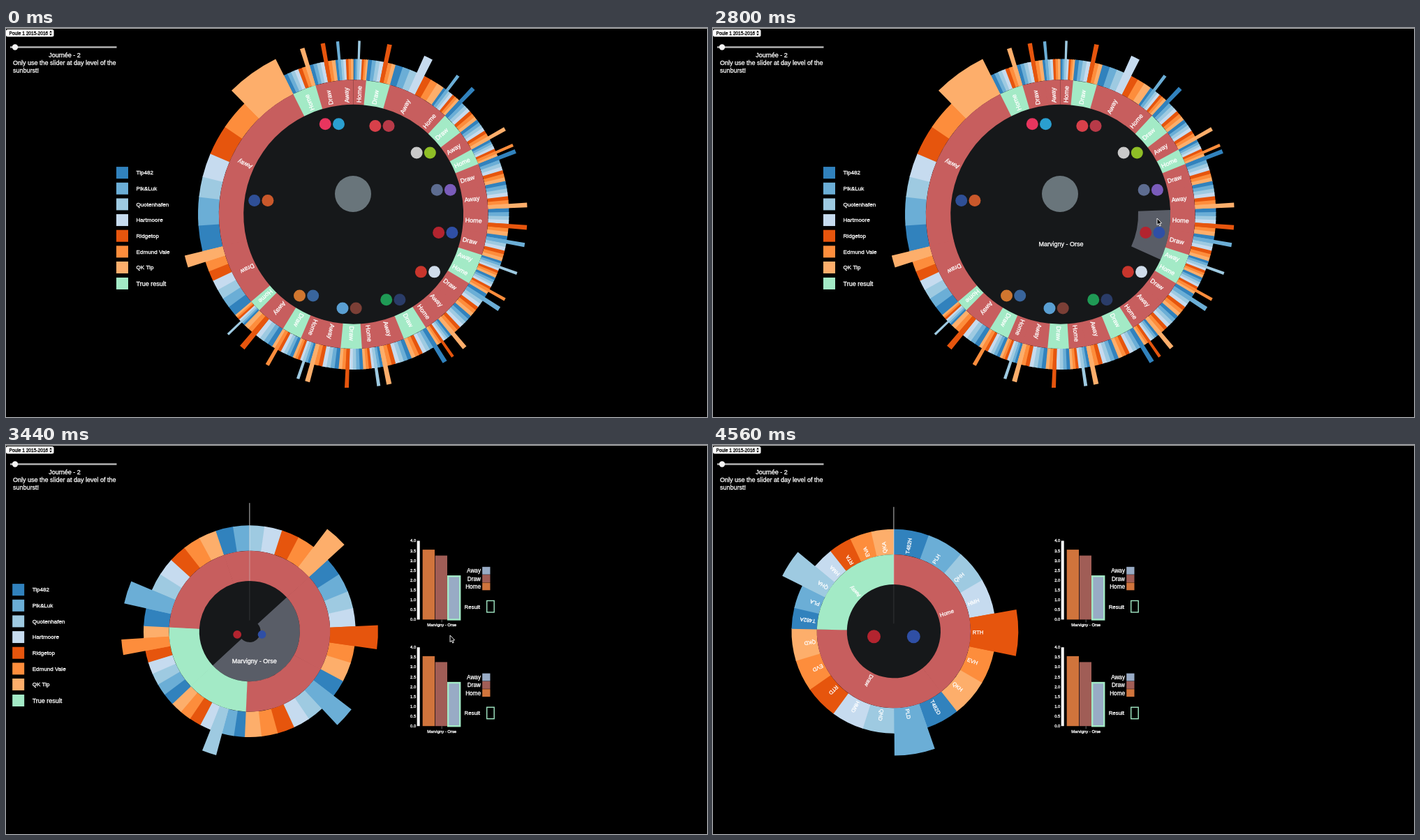
Animation of 1004 by 558 pixels, one loop 4.88 s. Source, as an HTML page with a canvas:

```html
<!DOCTYPE html>
<html lang="en">
<head>
<meta charset="utf-8">
<title>Odds sunburst</title>
<style>
html, body { margin: 0; width: 100%; height: 100%; overflow: hidden; background: #000; }
canvas { display: block; width: 1004px; height: 558px; }
</style>
</head>
<body>
<canvas id="stage"></canvas>
<script>
const W = 1004, H = 558, LOOP = 4880, STEP = 80;
const canvas = document.getElementById('stage');
const g = canvas.getContext('2d');
const dpr = window.devicePixelRatio || 1;
canvas.width = W * dpr;
canvas.height = H * dpr;

const FONT = '"Liberation Sans", Arial, sans-serif';
const DARK = '#16181a', HOVER = '#595d67', RED = '#c75e5e', GREEN = '#a3eac6';
const BOOKS = [
  ['Tip482', 'T482', '#3182bd'],
  ['Pik&Luk', 'PL', '#6baed6'],
  ['Quotenhafen', 'QH', '#9ecae1'],
  ['Hartmoore', 'HM', '#c6dbef'],
  ['Ridgetop', 'RT', '#e6550d'],
  ['Edmund Vale', 'EV', '#fd8d3c'],
  ['QK Tip', 'QK', '#fdae6b']
];
const OUTCOMES = ['Home', 'Draw', 'Away'];
const FIXTURE = 'Marvigny - Orse';
const CX = 497.7, CY = 267.2, FOCUS = 3;

// end angles of home, draw, away | best bookmaker of each | result | team colours
const MATCHES = [
  [[5.4, 15.7, 35.4], [2, 4, 3], 1, '#d8404a', '#b83a48'],
  [[42.8, 52.5, 61.2], [1, 0, 6], 1, '#c9c9c9', '#8fbe26'],
  [[68, 77.6, 87.7], [5, 0, 6], 0, '#5d6c90', '#7a5cba'],
  [[98.1, 107.6, 114.1], [4, 1, 2], 2, '#b3242f', '#2f4fa5'],
  [[120.9, 131, 141], [5, 1, 6], 0, '#c8352c', '#cfdcea'],
  [[147.5, 158, 169], [4, 0, 6], 1, '#1f9a55', '#2a3c68'],
  [[176.4, 185.5, 196.2], [2, 4, 6], 1, '#5a9fd2', '#7b3f36'],
  [[203, 211.6, 224.4], [2, 5, 4], 1, '#d0762f', '#39659c'],
  [[229.5, 256.2, 333.4], [2, 6, 6], 0, '#2f4f96', '#c9582b'],
  [[343.6, 353.3, 360], [6, 4, 1], 0, '#e8355e', '#2a9fd0']
];
// bookmaker shares where they clearly differ, keyed by match and outcome
const SHARES = {
  '3-0': [20, 21, 19, 20, 21.6, 18.8, 21.6],
  '3-1': [19, 19, 18, 18.6, 19, 18.1, 18.3],
  '3-2': [11.8, 13.1, 13.1, 12, 13, 12.3, 12.7],
  '8-2': [9.6, 10.6, 7.6, 9, 11.3, 11.3, 18]
};

// Build the tree as flat lists of slices, x in turns.
const matches = [], outcomes = [], odds = [];
let x = 0;
MATCHES.forEach(([ends, best, result, ...teams], m) => {
  const m0 = x;
  ends.forEach((end, o) => {
    const x0 = x, x1 = end / 360;
    outcomes.push({ x0, x1, color: o === result ? GREEN : RED, label: OUTCOMES[o], match: m });
    const share = SHARES[m + '-' + o] || BOOKS.map((_, b) => b === best[o] ? 1.07 : 1);
    const sum = share.reduce((a, b) => a + b);
    BOOKS.forEach(([, code, color], b) => {
      const next = x + (x1 - x0) * share[b] / sum;
      odds.push({ x0: x, x1: next, color, label: code + OUTCOMES[o][0], match: m, top: b === best[o] });
      x = next;
    });
    x = x1;
  });
  matches.push({ x0: m0, x1: x, teams });
});

const clamp = v => Math.max(0, Math.min(1, v));
const mix = (a, b, p) => a + (b - a) * p;
const ease = u => u < .5 ? 4 * u ** 3 : 1 - 4 * (1 - u) ** 3;

function track(keys, t) {
  if (t <= keys[0][0]) return keys[0][1];
  for (let i = 1; i < keys.length; i++) {
    const [ta, a] = keys[i - 1], [tb, b] = keys[i];
    if (t <= tb) return mix(a, b, (t - ta) / (tb - ta));
  }
  return keys[keys.length - 1][1];
}

const SLIDE = [[3200, 0], [3280, .1], [3440, .545], [3600, .872], [3760, 1]];
const MOUSE_X = [[1920, 640], [2160, 637], [2800, 636]];
const MOUSE_Y = [[1920, 262], [2160, 264], [2400, 267], [2800, 273]];

// A thin outline gives the text its slightly heavy weight.
function text(str, x, y, size, align = 'left', color = '#fff') {
  g.font = size + 'px ' + FONT;
  g.textAlign = align;
  g.textBaseline = 'alphabetic';
  g.fillStyle = g.strokeStyle = color;
  g.lineWidth = .3;
  g.fillText(str, x, y + size * .35);
  g.strokeText(str, x, y + size * .35);
}

function rect(x, y, w, h, color) {
  g.fillStyle = color;
  g.fillRect(x, y, w, h);
}

function frame(x, y, w, h, width) {
  g.strokeStyle = GREEN;
  g.lineWidth = width;
  g.strokeRect(x, y, w, h);
}

function disc(x, y, r, color) {
  g.fillStyle = color;
  g.beginPath();
  g.arc(x, y, r, 0, 7);
  g.fill();
}

// Angle and radius scales of the zoomable sunburst at zoom p.
function scales(p) {
  const f = matches[FOCUS];
  const lo = p * f.x0, hi = mix(1, f.x1, p);
  const root = Math.sqrt(.2 * p), inner = 11 * p, outer = mix(249, 178.4, p);
  return {
    angle: v => 2 * Math.PI * clamp((v - lo) / (hi - lo)),
    radius: level => mix(inner, outer, clamp((Math.sqrt(level / 5) - root) / (1 - root)))
  };
}

// Slices reach a little under the next one so that no seam shows.
function slice(cx, s, d, from, to, color) {
  const a0 = s.angle(d.x0), a1 = s.angle(d.x1);
  if (a1 - a0 < 1e-4) return;
  const turn = -Math.PI / 2;
  const end = a1 + (to === 5 || a1 > 6.28 ? 0 : .006);
  g.fillStyle = color;
  g.beginPath();
  g.arc(cx, CY, s.radius(to), a0 + turn, end + turn);
  g.arc(cx, CY, s.radius(from), end + turn, a0 + turn, true);
  g.fill();
}

function sliceLabel(cx, s, d, level, size) {
  const mid = (s.angle(d.x0) + s.angle(d.x1)) / 2;
  g.save();
  g.translate(cx, CY);
  g.rotate(mid - Math.PI / 2);
  text(d.label, s.radius(level) + 2.8, 0, size);
  g.restore();
}

function sunburst(t, cx, p, slide) {
  const s = scales(p);
  disc(cx, CY, s.radius(2) + .5, DARK);
  if (t >= 1920 && t < 3920) slice(cx, s, matches[FOCUS], 1, 2, HOVER);
  odds.forEach(d => slice(cx, s, d, 3, 4, d.color));
  odds.filter(d => d.top).forEach(d => slice(cx, s, d, 3, 5, d.color));
  outcomes.forEach(d => slice(cx, s, d, 2, 3, d.color));

  // Slices squeezed to nothing leave a hairline at the top.
  if (p > .05) {
    const alphas = [.12, .4, .6, .75];
    alphas.forEach((a, i) => {
      const far = s.radius(i + 2), near = s.radius(i + 1);
      rect(cx - .5, CY - far, 1, far - near, `rgba(255,255,255,${a})`);
    });
  }

  if (t <= 3280) {
    outcomes.forEach(d => sliceLabel(cx, s, d, 2, 9));
  } else if (t > 3760) {
    g.globalAlpha = clamp((t - 3760) / 320);
    const mine = d => d.match === FOCUS;
    outcomes.filter(mine).forEach(d => sliceLabel(cx, s, d, 2, 7.8));
    odds.filter(mine).forEach(d => sliceLabel(cx, s, d, 3, 7.6));
    g.globalAlpha = 1;
  }

  if (t < 3280) {
    disc(497, 238, 26, '#69757b');
    matches.forEach(m => {
      const a = Math.PI * (m.x0 + m.x1);
      m.teams.forEach((c, i) =>
        disc(cx + 134 * Math.sin(a) + (i ? 9.6 : -9.6), CY + 1 - 134 * Math.cos(a), 8.5, c));
    });
  } else {
    matches[FOCUS].teams.forEach((c, i) =>
      disc(cx + (i ? 28.4 : -28.4) * slide, CY + 7.5 * slide, 9.5 * slide, c));
  }
  if (t >= 1920 && t < 3920) text(FIXTURE, cx + (t < 3280 ? .8 : 6.8), 309.5, 9, 'center');
}

function chart(x, y) {
  const unit = 28.25, base = y + 113;
  const bars = [[3.55, '#d0743c'], [3.25, '#a05d56'], [2.2, '#98abc5']];
  rect(x - 1.5, y, 4, 113, '#fff');
  for (let i = 0; i <= 8; i++) text((i / 2).toFixed(1), x - 3, base - i * unit / 2, 5.8, 'right');
  rect(x + 33.5, base, 1, 4, '#666');
  bars.forEach(([v, c], i) => rect(x + 6.5 + i * 18, base - v * unit, 17.3, v * unit, c));
  frame(x + 43, base - 2.2 * unit, 17, 2.2 * unit, 2.4);
  text(FIXTURE, x + 34, y + 120.5, 5.9, 'center');
  bars.forEach(([, c], i) => {
    const ly = y + 60 - i * 11.3;
    rect(x + 92, ly, 11.3, 10.9, c);
    text(OUTCOMES[i], x + 89.8, ly + 5.6, 8.2, 'right');
  });
  text('Result', x + 88.8, y + 94.5, 7.9, 'right');
  frame(x + 98.5, y + 86, 10.5, 16.5, 1.4);
}

function legend(x) {
  BOOKS.forEach(([name, , color], i) => {
    const y = 199.1 + i * 22.65;
    rect(x, y, 17, 17, color);
    text(name, x + 28.5, y + 8.5, 8.1);
  });
  rect(x, 358, 17, 17, GREEN);
  text('True result', x + 28.5, 366.5, 9);
}

function triangle(x, y, h) {
  g.beginPath();
  g.moveTo(x - 1.8, y);
  g.lineTo(x + 1.8, y);
  g.lineTo(x, y + h);
  g.fill();
}

function controls() {
  rect(0, 0, W, 1, '#b4b4b4');
  g.fillStyle = '#fff';
  g.beginPath();
  g.roundRect(0, 2, 68.5, 10.5, 2.5);
  g.fill();
  text('Poule 1 2015-2016', 4.5, 7.3, 6.6, 'left', '#000');
  triangle(64, 6.4, -2.8);
  triangle(64, 8.2, 2.8);
  rect(6, 26.3, 152.5, 2.4, '#b8b8b8');
  disc(13, 27.5, 4.2, '#f4f4f4');
  text('Journée - 2', 84, 38.8, 9, 'center');
  text('Only use the slider at day level of the', 10, 49.8, 9);
  text('sunburst!', 10, 60.6, 9);
}

function pointer(x, y) {
  const shape = [[0, 0], [0, 9.6], [2.2, 7.6], [3.7, 11], [5.2, 10.4], [3.8, 7.1], [6.6, 6.9]];
  g.beginPath();
  shape.forEach(([dx, dy]) => g.lineTo(x + dx, y + dy));
  g.closePath();
  g.fillStyle = '#000';
  g.fill();
  g.strokeStyle = '#fff';
  g.lineWidth = .9;
  g.stroke();
}

function draw(t) {
  const slide = ease(track(SLIDE, t));
  const zoom = ease(clamp((t - 3252) / 258));
  const shift = 238.8 * slide;
  g.setTransform(dpr, 0, 0, dpr, 0, 0);
  rect(0, 0, W, H, '#000');
  controls();
  legend(158 - shift);
  sunburst(t, CX - shift, zoom, slide);
  if (t >= 3280) {
    chart(739 - shift, 137.4);
    chart(739 - shift, 290.2);
  }
  if (t >= 1920 && t < 4080) pointer(track(MOUSE_X, t), track(MOUSE_Y, t));
}

const start = performance.now();
function tick() {
  const t = (performance.now() - start) % LOOP;
  draw(Math.floor(t / STEP) * STEP);
  requestAnimationFrame(tick);
}
tick();
</script>
</body>
</html>
```
